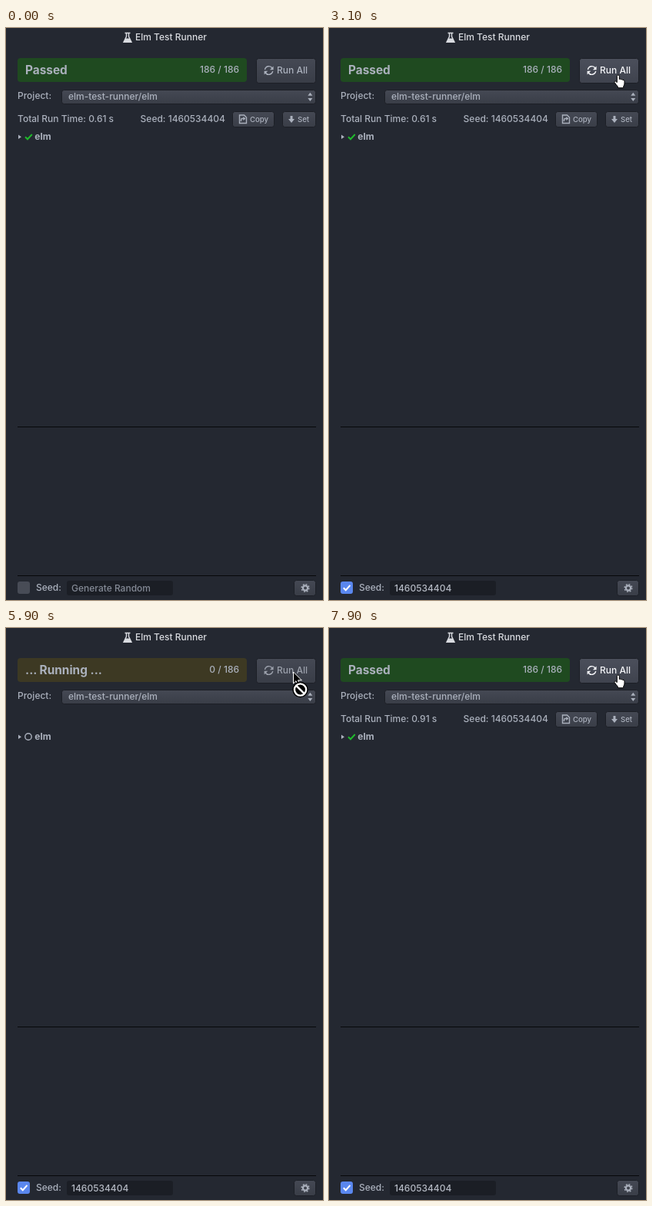
Animation of 412 by 742 pixels, one loop 8 s. Source, as an HTML page:

```html
<!DOCTYPE html>
<html lang="en">
<head>
<meta charset="utf-8">
<title>Elm Test Runner</title>
<style>
html, body { margin: 0; width: 100%; height: 100%; overflow: hidden; background: #242831; }
svg { display: block; width: 412px; height: 742px; font: 500 12px Inter, "Open Sans", sans-serif; color: #abb1bd; cursor: default; }
text { fill: currentColor; white-space: pre; }
.bold { font-weight: 700; }
.big { font-size: 15.4px; }
.small { font-size: 9.6px; }
.end { text-anchor: end; }
.line { fill: none; stroke: currentColor; stroke-width: 1.4; }
.solid { fill: currentColor; }
.btn > rect { fill: url(#face); stroke: #1c1f26; }
.hover { color: #f4f5f8; }
.hover > rect { fill: url(#lit); }
.outline { stroke: #fff; fill: #000; stroke-linejoin: round; }
</style>
</head>
<body>
<svg viewBox="0 0 412 742">
  <defs>
    <linearGradient id="face" x2="0" y2="1"><stop stop-color="#454954"/><stop offset="1" stop-color="#393d47"/></linearGradient>
    <linearGradient id="lit" x2="0" y2="1"><stop stop-color="#4b4f5b"/><stop offset="1" stop-color="#3f434e"/></linearGradient>
  </defs>

  <g color="#d9dbe0">
    <path class="line" stroke-width="1.2" d="M154.5 6.5h7M156.5 7v4l-3.5 7.3h10l-3.5-7.3v-4"/>
    <path class="solid" d="M155.3 13.5h5.4l2 4.5h-9.4z"/>
    <text x="168" y="16">Elm Test Runner</text>
  </g>

  <rect id="bar" x="15" y="39" width="298" height="31" rx="4"/>
  <text id="status" class="bold big" x="25" y="60"></text>
  <text id="count" class="end" x="303" y="58.3"></text>

  <g id="run" class="btn">
    <rect x="325.5" y="39.5" width="77" height="32" rx="3"/>
    <path class="line" stroke-width="1.6" d="M336.5 54a5.2 5.2 0 0 1 9.5-2M346.7 56a5.2 5.2 0 0 1-9.5 2"/>
    <path class="solid" d="M347.6 49.5v4.7h-4.7zM335.6 60.5v-4.7h4.7z"/>
    <text x="352" y="59.3">Run All</text>
  </g>

  <text x="15" y="92.3">Project:</text>
  <rect x="72.5" y="80.5" width="330" height="18" rx="3" fill="url(#face)" stroke="#1c1f26"/>
  <text x="81" y="93.3">elm-test-runner/elm</text>
  <path class="solid" d="M392.3 87.8l3-4 3 4zM392.3 91l3 4 3-4z"/>

  <text id="total" x="15" y="122.3"></text>
  <g id="seedRow">
    <text class="end" x="285" y="122.3">Seed: 1460534404</text>
    <g class="btn">
      <rect x="294.5" y="108.5" width="54" height="20" rx="3"/>
      <path class="line" stroke-width="1.1" d="M303.5 113h6l3 3v7.500h-9zM305.500 121v-2q0-1.500 1.500-1.500h2"/>
      <path class="solid" d="M308.300 115l3.200 2.500-3.200 2.500z"/>
      <text class="small" x="317" y="122">Copy</text>
    </g>
    <g id="set" class="btn">
      <rect x="359.500" y="108.500" width="43" height="20" rx="3"/>
      <path class="solid" d="M369.500 114h3v4h2.500l-4 5-4-5h2.500z"/>
      <text class="small" x="379" y="122">Set</text>
    </g>
  </g>

  <path class="solid" d="M16 138.500l4 2.700-4 2.700z"/>
  <path id="tick" fill="none" stroke="#20b92c" stroke-width="2" d="M25 141.200l3 3 5.800-6.200"/>
  <circle id="pending" class="line" cx="29" cy="141" r="4.200"/>
  <text class="bold" x="37.300" y="145.200">elm</text>

  <path stroke="#07080a" d="M15 517.500h388M15 710.500h388"/>

  <rect id="box" x="15" y="718" width="16" height="16" rx="3"/>
  <path id="boxTick" fill="none" stroke="#fff" stroke-width="2" d="M18.800 726.200l3 3 5.700-6.400"/>
  <text x="39" y="730.300">Seed:</text>
  <rect x="79" y="717" width="138" height="19" rx="3" fill="#1b1e25"/>
  <text id="seed" x="85" y="731"></text>
  <g class="btn">
    <rect x="374.500" y="716.500" width="28" height="20" rx="3"/>
    <circle class="line" cx="389" cy="726.500" r="4.900" stroke-width="2" stroke-dasharray="1.920 1.920"/>
    <circle class="line" cx="389" cy="726.500" r="3.100" style="stroke-width:2.200"/>
  </g>

  <g id="cursor">
    <path id="hand" fill="#fff" stroke="#000" stroke-linejoin="round" d="M-1.700 1.500q0-1.500 1.500-1.500t1.500 1.500v4q1-1 2.300.4 1.200-.8 2.200.5 2-.6 2.200 1.500v3q0 2-1.300 3.800v2h-7.200v-1.500q-1.800-2-4.500-5.700-.3-1.800 1.600-1.400l1.700 1.500z"/>
    <path id="arrow" class="outline" d="M0 0v15l3.500-3.300 2.400 5.300 2.400-1-2.300-5.200h4.800z"/>
    <g id="ban" fill="none">
      <circle cx="9" cy="23" r="8" stroke="#000" stroke-width="4.400" fill="#000"/>
      <circle cx="9" cy="23" r="7.600" stroke="#fff" stroke-width="2.400"/>
      <path stroke="#fff" stroke-width="2.400" d="M3.600 17.600l10.800 10.800"/>
    </g>
  </g>
</svg>
<script>
const $ = id => document.getElementById(id);
const show = (id, on) => $(id).style.display = on ? "" : "none";
const LOOP = 8000, STEP = 100, TESTS = 186;
const APPEAR = 200, ON_SET = 900, CLICK_SET = 1600, LEAVE_SET = 2500, ON_RUN = 2900;
const CLICK_RUN = 3900, BLOCK = 4400, RESULTS = 6900, DONE = 7600;

const bars = [[CLICK_RUN, 31, 74, 32], [4000, 31, 74, 32], [5900, 61, 57, 35], [7200, 69, 69, 35], [DONE, 70, 71, 35]];
const path = [[APPEAR, 384, 277], [ON_SET, 383, 119.5], [LEAVE_SET, 383, 119.5], [ON_RUN, 376, 61]];
const ease = p => p * p * (3 - 2 * p);
const linear = p => p;

// Interpolates rows of [time, ...values], holding the ends.
function track(rows, t, curve) {
  const i = rows.findIndex(row => row[0] > t);
  if (i < 0) return rows[rows.length - 1].slice(1);
  if (i === 0) return rows[0].slice(1);
  const [a, b] = [rows[i - 1], rows[i]];
  const p = curve((t - a[0]) / (b[0] - a[0]));
  return a.slice(1).map((v, k) => v + (b[k + 1] - v) * p);
}

function draw(t) {
  const running = t >= CLICK_RUN && t < DONE;
  const results = t < CLICK_RUN || t >= RESULTS;
  const seeded = t >= CLICK_SET;
  const blocked = t >= BLOCK && t < DONE;
  const overSet = t >= ON_SET && t < LEAVE_SET + 200;
  const overRun = t >= ON_RUN - 100;
  const pointing = (overSet || overRun) && !blocked;
  const passed = Math.round(Math.max(0, t - RESULTS) * 76 / 300);

  $("bar").style.fill = `rgb(${running ? track(bars, t, linear) : [31, 74, 32]})`;
  $("status").textContent = running ? "... Running ..." : "Passed";
  $("count").textContent = `${running ? passed : TESTS} / ${TESTS}`;
  $("total").textContent = running ? "" : `Total Run Time: ${t < DONE ? "0.61" : "0.91"} s`;
  $("run").classList.toggle("hover", overRun && !running);
  $("run").style.color = running ? "#9ba0ab" : "";
  $("set").classList.toggle("hover", overSet);
  show("seedRow", results);
  show("tick", results);
  show("pending", !results);

  $("box").style.fill = seeded ? "#5a87ee" : "#484c56";
  show("boxTick", seeded);
  $("seed").textContent = seeded ? "1460534404" : "Generate Random";
  $("seed").style.color = seeded ? "#b5bac4" : "#848a96";

  const [x, y] = blocked ? [373.5, 57] : track(path, t, ease);
  $("cursor").setAttribute("transform", `translate(${x} ${y})`);
  show("cursor", t >= APPEAR);
  show("hand", pointing);
  show("arrow", !pointing);
  show("ban", blocked);
}

const start = performance.now();
function frame() {
  const t = (performance.now() - start) % LOOP;
  draw(Math.floor(t / STEP) * STEP);
  requestAnimationFrame(frame);
}
frame();
</script>
</body>
</html>
```
